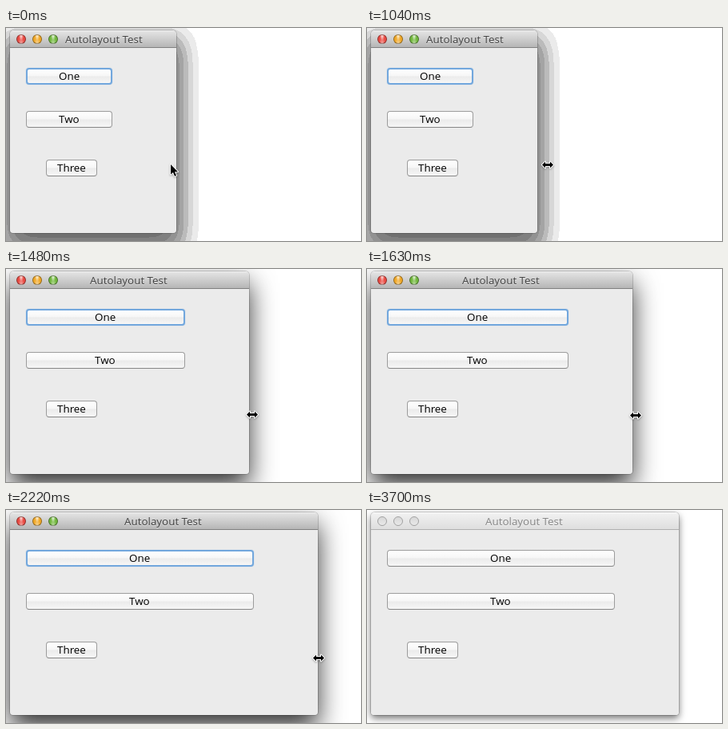
Recreate the animation shown at these times as an HTML page. Size 444 by 267 pixels, loop 3800 ms.

```html
<!DOCTYPE html>
<html lang="en">
<head>
<meta charset="utf-8">
<title>Autolayout Test</title>
<style>
html, body { margin: 0; width: 100%; height: 100%; overflow: hidden; background: #fff; }
#stage { position: relative; width: 444px; height: 267px; overflow: hidden;
  font: 13.4px/20px "Open Sans", "Noto Sans", sans-serif; color: #000; }
#stage * { position: absolute; box-sizing: border-box; white-space: nowrap; }
#shadow { left: 5px; top: 18px; height: 255px; background: #000; }
#win { left: 5px; top: 3px; height: 254px; background: #ebebeb; border-radius: 5px 5px 4px 4px;
  overflow: hidden; }
#edge { left: 5px; top: 3px; height: 254px; border-radius: 5px 5px 4px 4px;
  box-shadow: 0 0 0 1px rgba(0,0,0,.18); }
#bar { left: 0; top: 0; width: 100%; height: 22px; border-bottom: 1px solid #818181;
  background: linear-gradient(#f2f2f2, #e2e2e2 8%, #b6b6b6); }
#title { top: 4px; color: #404040; text-shadow: 0 1px rgba(255,255,255,.5); }
.light { top: 8px; width: 12px; height: 12px; border-radius: 50%; border: 1px solid rgba(0,0,0,.38);
  background: radial-gradient(ellipse at 50% 12%, rgba(255,255,255,.85), transparent 42%),
    radial-gradient(ellipse at 50% 105%, rgba(255,255,255,.55), transparent 55%), var(--c); }
.button { left: 25px; height: 21px; border: 1px solid #9c9c9c; border-bottom-color: #868686; border-radius: 4px;
  background: linear-gradient(#fff, #f6f6f6 48%, #ebebeb 52%, #f6f6f6); }
.label { font-weight: 500; }
.active .focus { border: 2px solid #72a7dd; box-shadow: 0 0 1px #72a7dd; }
.inactive #bar { background: linear-gradient(#fafafa, #f0f0f0 10%, #dedede); border-color: #b0b0b0; }
.inactive #title { color: #858585; }
.inactive .light { background: linear-gradient(#d8d8d8, #e9e9e9); border-color: #a0a0a0; }
.inactive #shadow { display: none; }
.inactive #edge { box-shadow: 0 0 0 1px rgba(0,0,0,.16), 0 4px 10px rgba(0,0,0,.55); }
#cursors { left: 0; top: 0; filter: drop-shadow(0 1px 1px rgba(0,0,0,.3)); }
#cursors path { stroke: #fff; stroke-width: 2; paint-order: stroke; stroke-linejoin: round; }
</style>
</head>
<body>
<div id="stage">
  <svg width="0" height="0">
    <filter id="banded" x="-60" y="-60" width="560" height="400" filterUnits="userSpaceOnUse">
      <feGaussianBlur stdDeviation="14.5"/>
      <feComponentTransfer><feFuncA type="gamma" exponent=".5"/></feComponentTransfer>
      <feComponentTransfer><feFuncA type="discrete" tableValues="0 .08 .16 .27 .36 .43 .5 .56"/></feComponentTransfer>
    </filter>
  </svg>
  <div id="shadow"></div>
  <div id="edge"></div>
  <div id="win">
    <div id="bar"></div>
    <div class="light" style="left:8px;top:5px;--c:#ea4a42"></div>
    <div class="light" style="left:28px;top:5px;--c:#f0a827"></div>
    <div class="light" style="left:48px;top:5px;--c:#72b83e"></div>
  </div>
  <div id="title">Autolayout Test</div>
  <div class="button wide focus" style="top:50px"></div>
  <div class="button wide" style="top:104px"></div>
  <div class="button" style="left:50px;top:165px;width:64px"></div>
  <div class="label mid" style="top:50px">One</div>
  <div class="label mid" style="top:104px">Two</div>
  <div class="label" style="left:64px;top:165px">Three</div>
  <svg id="cursors" width="444" height="267">
    <path id="arrow" d="M1 1.5V14L4 11.4L6 16.2L8 15.4L6 10.7H10Z"/>
    <path id="resize" d="M-7 0L-3-4V-1.4H3V-4L7 0L3 4V1.4H-3V4Z"/>
  </svg>
</div>
<script>
const $ = id => document.getElementById(id);
const all = (sel, fn) => document.querySelectorAll(sel).forEach(fn);
const LOOP = 3800;

// start ms, window's right edge, cursor, cursor x, cursor y
const steps = [
  [0, 213, 'arrow', 205, 169],
  [150, 213, 'resize', 212, 172],
  [290, 213, 'resize', 214, 172],
  [740, 213, 'resize', 214, 171],
  [1040, 213, 'resize', 226, 171],
  [1190, 254, 'resize', 260, 176],
  [1330, 279, 'resize', 284, 179],
  [1480, 304, 'resize', 308, 182],
  [1630, 332, 'resize', 336, 183],
  [1780, 362, 'resize', 365, 184],
  [1920, 384, 'resize', 386, 185],
  [2070, 389, 'resize', 390, 185],
  [2220, 390, 'resize', 391, 185],
  [2810, 390, 'arrow', 402, 213],
  [2960, 390, 'arrow', 415, 249],
  [3100, 390, 'arrow', 414, 256],
  [3250, 390, ''],
  [3700, 390, '']
];

function draw(t) {
  const [start, right, cursor, x, y] = steps.findLast(s => s[0] <= t);
  $('stage').className = start < 3700 ? 'active' : 'inactive';
  for (const id of ['win', 'edge', 'shadow']) $(id).style.width = right - 5 + 'px';
  $('shadow').style.filter = right === 213 ? 'url(#banded)' : 'blur(16.5px) opacity(.8)';
  $('title').style.left = Math.max(74, Math.floor((right + 5) / 2 - 49)) + 'px';
  const width = right - 105;
  all('.wide', el => el.style.width = width + 'px');
  all('.mid', el => el.style.left = Math.floor(25 + width / 2 - 13) + 'px');
  for (const id of ['arrow', 'resize']) {
    $(id).style.display = id === cursor ? '' : 'none';
    if (id === cursor) $(id).setAttribute('transform', `translate(${x} ${y + .5})`);
  }
}

function tick() {
  draw(performance.now() % LOOP);
  requestAnimationFrame(tick);
}
tick();
</script>
</body>
</html>
```
